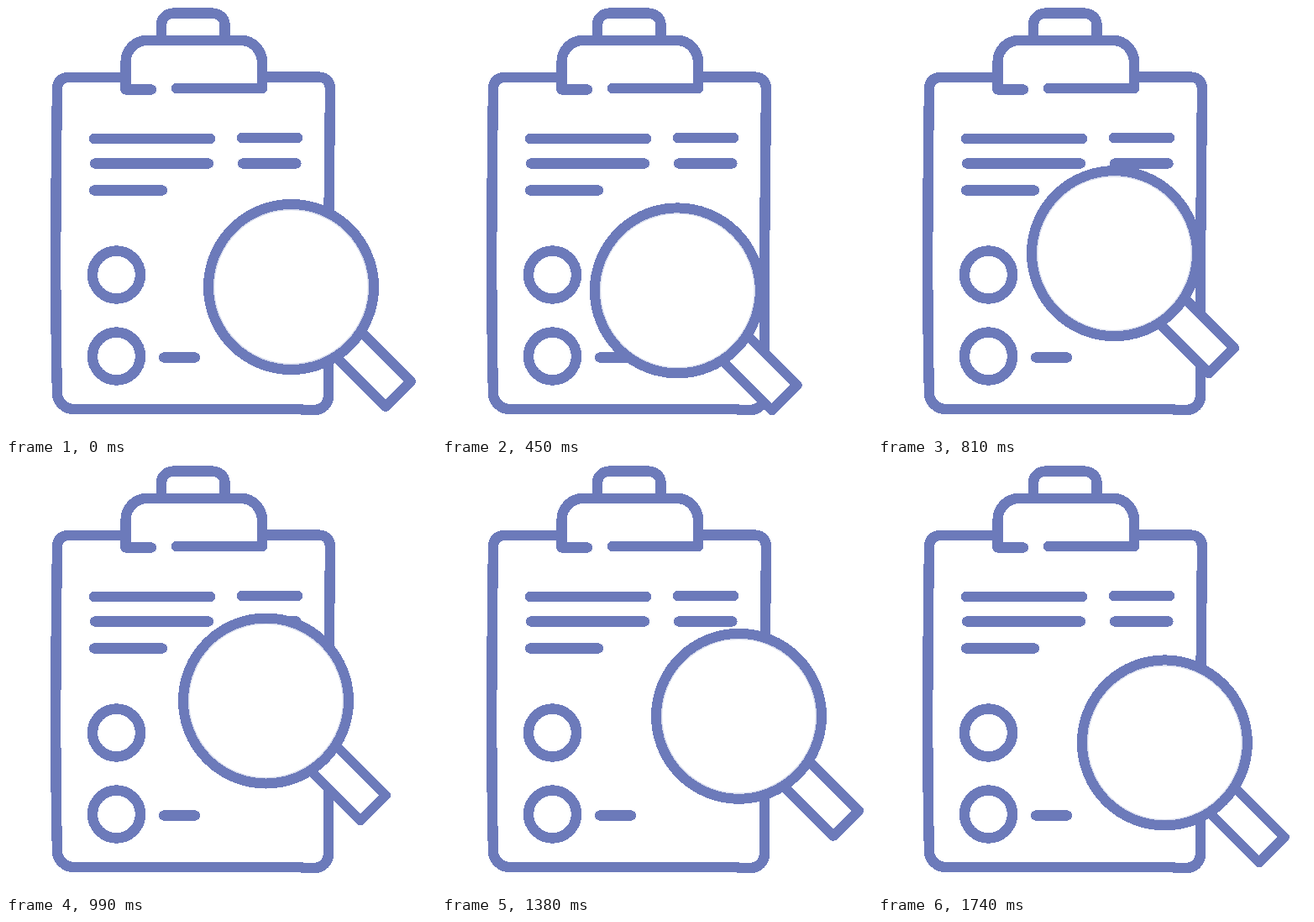
Animation, 512 px wide and 512 px high, one loop 1.77 s. Source, as an HTML page:

```html
<!DOCTYPE html>
<html lang="en">
<head>
<meta charset="utf-8">
<title>Clipboard search</title>
<style>
  html, body { margin: 0; width: 100%; height: 100%; overflow: hidden; background: #fff; }
  svg { display: block; width: 100vw; height: 100vh; }
</style>
</head>
<body>
<svg viewBox="0 0 512 512" fill="none" stroke="#6c7aba" stroke-width="12.4" stroke-linecap="round" stroke-linejoin="round" shape-rendering="crispEdges">
  <!-- board -->
  <path d="M141 85H75Q61 85 61 99Q57.5 330 61 461A20 19 0 0 0 81 480H350L355 481H368A16 17 0 0 0 384 464V300L386 98Q385 84.5 371 84.5H306"/>
  <!-- clip -->
  <path d="M173 99.5H142.500V67A25 26 0 0 1 167.500 41H280A25 26 0 0 1 305 67V98H203"/>
  <path d="M185 39V22A15 13.500 0 0 1 200 8.500H245A15.500 13.500 0 0 1 260.500 22V39"/>
  <!-- written lines -->
  <path d="M105 158H243M281 157H347M106 187.500H241M282 187.500H345.500M105 219.500H186M188 418.500H225"/>
  <circle cx="131.500" cy="320" r="28.500"/>
  <circle cx="131.500" cy="417" r="28.500"/>
  <g id="lens" fill="#fff" stroke-width="12">
    <path d="M80 50L142.500 112.500L112.500 142.500L50 80" stroke-linecap="butt"/>
    <circle r="98.500"/>
    <circle r="92" fill="none" stroke-width="1.500" stroke-opacity=".3" shape-rendering="auto"/>
  </g>
</svg>
<script>
  const LOOP = 1770, STEP = 30, REST = 60;
  const lens = document.getElementById('lens');

  // turning points of the lens centre: time, x, y
  const keys = [
    [REST, 339.5, 334.5], [270, 309.5, 349.5], [630, 267.5, 315.3], [990, 309.5, 282],
    [1170, 335.5, 281.3], [1380, 353.5, 300.3], [1680, 344, 327]
  ];
  const count = keys.length;
  const key = i => keys[(i + count) % count];
  const gap = i => ((i + 1) % count ? key(i + 1)[0] : LOOP) - key(i)[0];
  const rate = (i, axis) => (key(i + 1)[axis] - key(i)[axis]) / gap((i + count) % count);

  // slopes of the smooth closed spline through the keys, found by relaxation
  function solveSlopes(axis) {
    const m = Array(count).fill(0);
    for (let pass = 0; pass < 40; pass++) {
      for (let i = 0; i < count; i++) {
        const prev = (i + count - 1) % count, next = (i + 1) % count;
        const before = gap(prev), after = gap(i);
        m[i] = (after * (3 * rate(prev, axis) - m[prev])
          + before * (3 * rate(i, axis) - m[next])) / (2 * (before + after));
      }
    }
    return m;
  }
  const slopes = [1, 2].map(solveSlopes);

  function place(t, axis) {
    const i = keys.findLastIndex(k => k[0] <= t), j = (i + 1) % count;
    const m = slopes[axis - 1], span = gap(i);
    const u = (t - key(i)[0]) / span, v = 1 - u;
    return v * v * (1 + 2 * u) * key(i)[axis] + u * u * (3 - 2 * u) * key(j)[axis]
      + span * u * v * (v * m[i] - u * m[j]);
  }

  const start = performance.now();
  function draw(now) {
    const tick = Math.floor(Math.max(0, now - start) % LOOP / STEP) * STEP;
    const t = Math.max(REST, tick);
    lens.setAttribute('transform', `translate(${place(t, 1)} ${place(t, 2)})`);
    requestAnimationFrame(draw);
  }
  draw(start);
</script>
</body>
</html>
```
